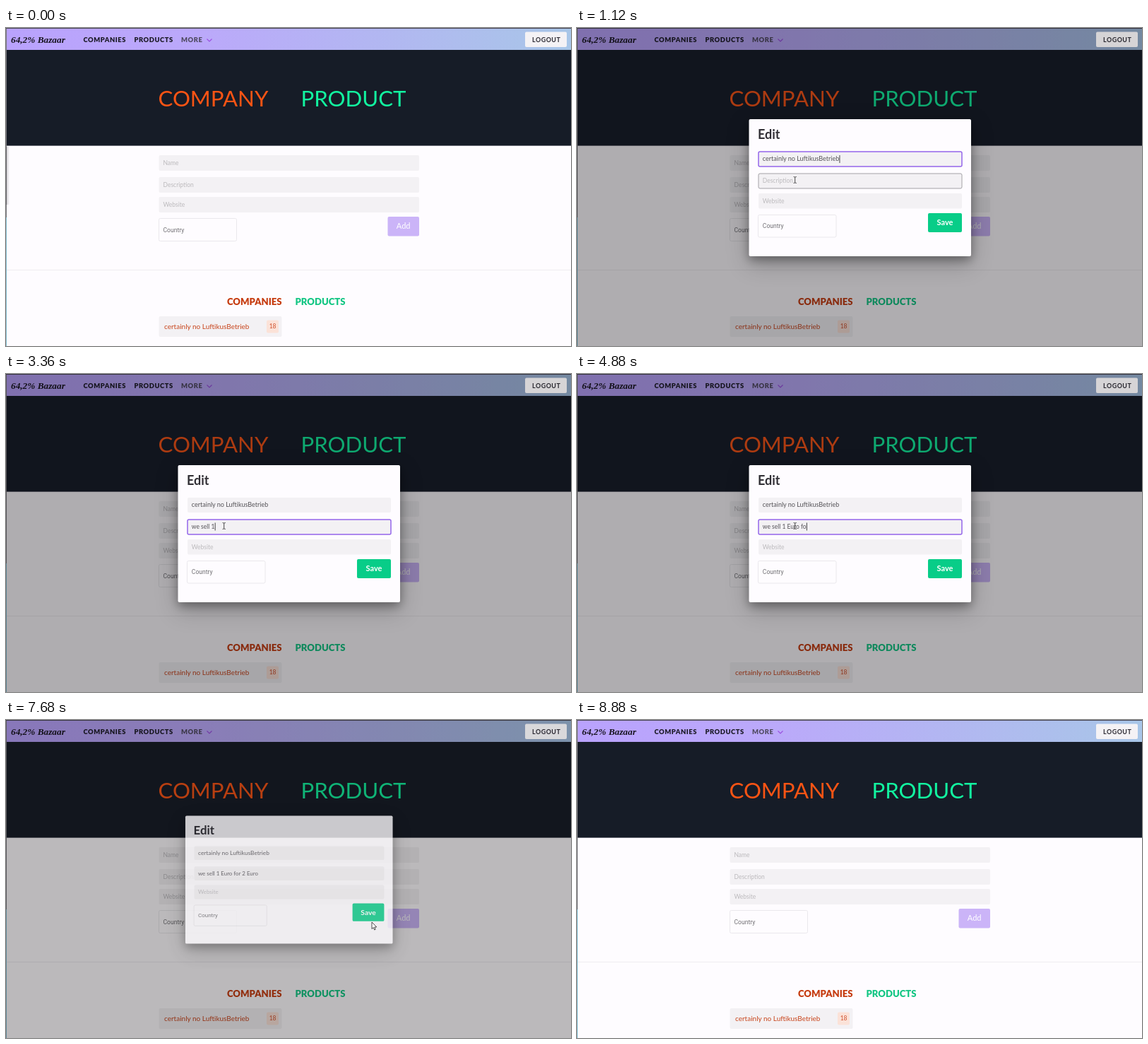
Recreate the animation shown at these times as an HTML page. Size 800x450 px, loop 8920 ms.

```html
<!DOCTYPE html>
<html lang="en">
<head>
<meta charset="utf-8">
<title>Edit a company</title>
<style>
  html, body { margin: 0; width: 100%; height: 100%; overflow: hidden; background: #fefcff; }
  svg { display: block; width: 800px; height: 450px; }
  text { font-family: Lato, "Open Sans", sans-serif; white-space: pre; }
  .brand { font: italic 700 13.3px "Liberation Serif", serif; fill: #17141f; }
  .nav { font-size: 9.4px; font-weight: 900; letter-spacing: .55px; fill: #1b1a26; }
  .logout { font-size: 8.9px; font-weight: 700; letter-spacing: .55px; fill: #2c2a33; }
  .hero { font-size: 31.2px; font-weight: 400; }
  .tab { font-size: 13.1px; font-weight: 900; }
  .input { fill: #f3f1f4; }
  .hint { font-size: 8.5px; fill: #bcbabd; }
  .value { font-size: 8.5px; fill: #555358; }
  .select { fill: #fefcff; stroke: #eae8ec; }
  .country { font: 8.6px Roboto, sans-serif; fill: #717074; }
  .button { font-size: 11px; fill: #fff; text-anchor: middle; }
  .panel { fill: #fefcff; filter: drop-shadow(0 5px 7px rgba(0,0,0,.32)) drop-shadow(0 9px 15px rgba(0,0,0,.24)); }
</style>
</head>
<body>
<svg viewBox="0 0 800 450">
  <defs>
    <linearGradient id="bar">
      <stop offset="0" stop-color="#b9a2fd"/>
      <stop offset=".35" stop-color="#bba9fa"/>
      <stop offset="1" stop-color="#a8c6e8"/>
    </linearGradient>
    <linearGradient id="edge">
      <stop offset="0" stop-color="#000" stop-opacity=".2"/>
      <stop offset="1" stop-color="#000" stop-opacity="0"/>
    </linearGradient>
  </defs>

  <rect width="800" height="450" fill="#fefcff"/>
  <rect width="800" height="31" fill="url(#bar)"/>
  <rect y="31" width="800" height="135.6" fill="#161c27"/>
  <text class="brand" x="7" y="20.5">64,2% Bazaar</text>
  <text class="nav" x="109.5" y="20">COMPANIES</text>
  <text class="nav" x="181.5" y="20">PRODUCTS</text>
  <text class="nav" x="248" y="20" style="fill:#4f4a60">MORE</text>
  <path d="M284.5 15.5l3.5 3.5 3.5-3.5" fill="none" stroke="#9a4fe0" stroke-width="1.1"/>
  <text class="hero" x="215.5" y="110.5" fill="#fb5414">COMPANY</text>
  <text class="hero" x="417.5" y="110.5" fill="#12f5a0">PRODUCT</text>

  <rect class="input" x="216.5" y="180" width="368.5" height="22" rx="2"/>
  <rect class="input" x="216.5" y="211" width="368.5" height="22" rx="2"/>
  <rect class="input" x="216.5" y="239" width="368.5" height="22" rx="2"/>
  <text class="hint" x="222.5" y="193.7">Name</text>
  <text class="hint" x="222.5" y="224.7">Description</text>
  <text class="hint" x="222.5" y="252.7">Website</text>
  <rect class="select" x="216.5" y="269.5" width="110" height="32" rx="2"/>
  <text class="country" x="222.5" y="289">Country</text>
  <rect x="540.5" y="267" width="44.5" height="27.5" rx="2" fill="#cbb4f8"/>
  <text class="button" x="562.7" y="284.3">Add</text>
  <rect y="342" width="800" height="1" fill="#eeecef"/>
  <text class="tab" x="313" y="392" fill="#c63c10">COMPANIES</text>
  <text class="tab" x="409.5" y="392" fill="#14c684">PRODUCTS</text>
  <rect class="input" x="216.5" y="408" width="174" height="29" rx="2"/>
  <text x="224" y="426" font-size="10" fill="#c8451c">certainly no LuftikusBetrieb</text>
  <rect x="369" y="413.5" width="17" height="18" rx="2" fill="#fbe2d8"/>
  <text x="377.6" y="425.4" font-size="8.5" fill="#d0502c" text-anchor="middle">18</text>
  <circle id="remove" cx="391" cy="408" r="4" fill="#7c7c7e"/>

  <rect width="1" height="268" fill="#77767c"/>
  <rect y="268" width="1" height="182" fill="#7fb9cc"/>
  <rect id="side" y="168" width="5" height="82" fill="url(#edge)"/>
  <rect width="800" height="1" fill="#4a4755"/>

  <rect id="shade" width="800" height="450" fill="#08080a"/>

  <g id="logout">
    <rect x="735" y="5.5" width="59" height="21.5" rx="2" fill="#f4f2f5"/>
    <text class="logout" x="745" y="19.5">LOGOUT</text>
    <rect id="logoutShade" x="735" y="5.5" width="59" height="21.5" rx="2" fill="#08080a"/>
  </g>

  <g id="dialog">
    <rect class="panel" x="243.5" y="129" width="314.5" height="194" rx="2"/>
    <text x="256" y="157.3" font-size="18" font-weight="700" fill="#323036">Edit</text>
    <rect class="input" id="name" x="257" y="175" width="288" height="21" rx="2"/>
    <rect class="input" id="about" x="257" y="206" width="288" height="21" rx="2"/>
    <rect class="input" x="257" y="234" width="288" height="21.5" rx="2"/>
    <text class="value" id="nameText" x="262.8" y="188.3" style="font-size:9px">certainly no LuftikusBetrieb</text>
    <text class="hint" id="aboutHint" x="262.8" y="219.2">Description</text>
    <text class="value" id="aboutText" x="262.8" y="219.2"></text>
    <text class="hint" x="262.8" y="247.5">Website</text>
    <rect class="select" x="256.5" y="264.5" width="110.5" height="31.5" rx="2"/>
    <text class="country" x="262.8" y="283.3">Country</text>
    <rect x="497" y="262" width="48" height="27" rx="2" fill="#08cd88"/>
    <text class="button" x="521" y="279.2" font-weight="700">Save</text>
    <rect id="caret" width=".9" height="11" fill="#333"/>
  </g>

  <g id="cursor">
    <path id="arrow" d="M0 0V9.6L2.2 7.6 3.7 11 5.2 10.3 3.8 7H6.8Z" fill="#fff" stroke="#222" stroke-width=".8"/>
    <path id="beam" d="M-2-4.5Q0-4.5 0-3.5Q0-4.5 2-4.5M0-3.5V3.5M-2 4.5Q0 4.5 0 3.5Q0 4.5 2 4.5" fill="none" stroke="#333" stroke-width=".9"/>
    <path id="hand" d="M-1 0Q0-1 1 0V4L5 5Q6 5.3 5.8 7L5 11H-1L-3.6 7Q-3.6 5.6-1 7Z" fill="#fff" stroke="#222" stroke-width=".8"/>
  </g>
</svg>
<script>
const LOOP = 8920;
const SENTENCE = "we sell 1 Euro for 2 Euro";
const TYPE_START = 1720, KEY_GAP = 190;
const NAME_FOCUS = 800, ABOUT_FOCUS = 1400;
const SHADE = 0.32;

// time, x, y of the pointer
const PATH = [
  [120, 330, 462], [480, 265, 415], [800, 265, 415], [1080, 308.7, 215],
  [6560, 308.7, 215], [7120, 518, 286], [7900, 518, 286], [8300, 440, 465]
];

const el = {};
document.querySelectorAll("[id]").forEach(node => el[node.id] = node);

const ramp = (t, from, to) => Math.min(1, Math.max(0, (t - from) / (to - from)));
const within = (t, from, to) => t >= from && t < to;
const smooth = p => p * p * (3 - 2 * p);
const cubicOut = p => 1 - (1 - p) ** 3;
const show = (node, on) => node.setAttribute("visibility", on ? "visible" : "hidden");
const border = (node, color, width) => {
  node.setAttribute("stroke", color);
  node.setAttribute("stroke-width", width);
};

function pointerAt(t) {
  let i = 0;
  while (i < PATH.length - 2 && t >= PATH[i + 1][0]) i++;
  const [t0, x0, y0] = PATH[i], [t1, x1, y1] = PATH[i + 1];
  const p = smooth(ramp(t, t0, t1));
  return [x0 + (x1 - x0) * p, y0 + (y1 - y0) * p];
}

function drawFields(t) {
  const count = t < TYPE_START ? 0
    : Math.min(SENTENCE.length, Math.floor((t - TYPE_START) / KEY_GAP) + 1);
  el.aboutText.textContent = SENTENCE.slice(0, count);
  show(el.aboutHint, count === 0);

  const onName = within(t, NAME_FOCUS, ABOUT_FOCUS);
  const onAbout = within(t, ABOUT_FOCUS, 7540);
  border(el.name, onName ? "#9466ea" : "none", 1.5);
  if (onAbout) border(el.about, "#9466ea", 1.5);
  else border(el.about, within(t, 1060, ABOUT_FOCUS) ? "#a3a1a6" : "none", 1);

  const text = onName ? el.nameText : el.aboutText;
  const width = onName || count ? text.getComputedTextLength() : 0;
  const lastKey = TYPE_START + (SENTENCE.length - 1) * KEY_GAP;
  const since = onName ? t - NAME_FOCUS : t < TYPE_START ? t - ABOUT_FOCUS : t - lastKey;
  const lit = since < 0 || since % 1000 < 500;
  el.caret.setAttribute("x", 263.1 + width);
  el.caret.setAttribute("y", onName ? 180 : 210.5);
  el.caret.setAttribute("opacity", (onName || onAbout) && lit ? 1 : 0);
}

function draw(t) {
  const shade = SHADE * ramp(t, 600, 800) * (1 - ramp(t, 7640, 7940));
  el.shade.setAttribute("opacity", shade);
  el.logoutShade.setAttribute("opacity", shade * 0.4);

  const open = t < 4000 ? cubicOut(ramp(t, 600, 850)) : cubicOut(1 - ramp(t, 7560, 7760));
  const scale = 0.7 + 0.3 * open;
  show(el.dialog, open > 0);
  el.dialog.setAttribute("opacity", open);
  el.dialog.setAttribute("transform",
    `translate(400.75 226) scale(${scale}) translate(-400.75 -226)`);
  drawFields(t);

  show(el.remove, within(t, 360, 840));
  el.side.setAttribute("opacity", 1 - ramp(t, 40, 200));

  const [x, y] = pointerAt(t);
  const beam = within(t, 1040, 6660), hand = within(t, 7000, 7640);
  el.cursor.setAttribute("transform", `translate(${x} ${y})`);
  show(el.beam, beam);
  show(el.hand, hand);
  show(el.arrow, !beam && !hand);
}

const start = performance.now();
function tick() {
  draw((performance.now() - start) % LOOP);
  requestAnimationFrame(tick);
}
tick();
</script>
</body>
</html>
```
